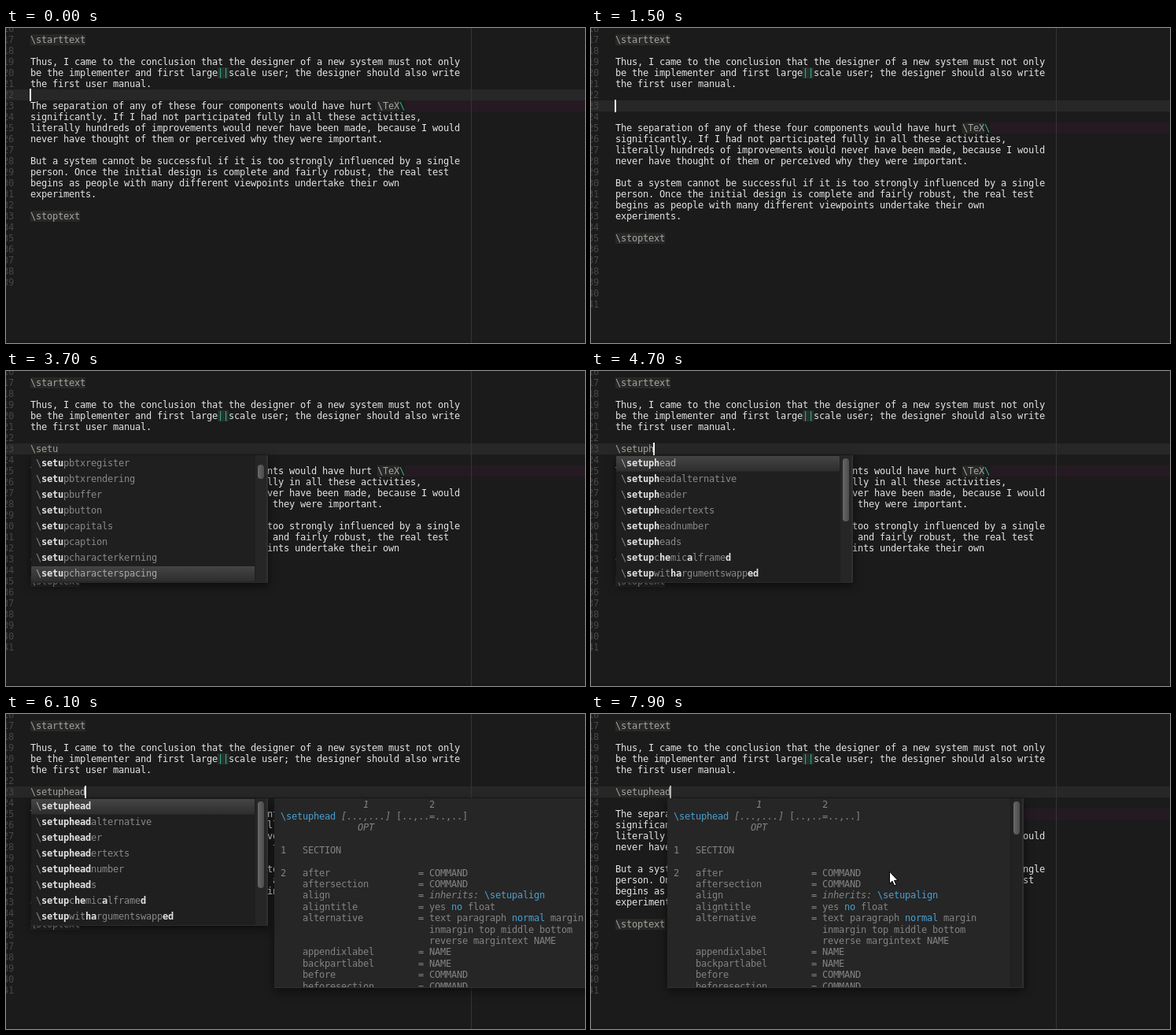
Recreate the animation shown at these times as an HTML page. Size 736 px wide and 400 px high, loop 8 s.

```html
<!DOCTYPE html>
<html lang="en">
<head>
<meta charset="utf-8">
<title>Command completion in a text editor</title>
<style>
  html, body { margin: 0; width: 100%; height: 100%; overflow: hidden; background: #1b1b1b; }
  svg { display: block; width: 736px; height: 400px; }
  text {
    font: 12px "DejaVu Sans Mono", monospace;
    letter-spacing: -.2246px;
    white-space: pre;
    fill: #e2e4e4;
  }
  .num { fill: #464646; text-anchor: end; }
  .cmd { fill: #a3a3a0; }
  .sym { fill: #35b58c; }
  .item { fill: #898989; }
  .item.on { fill: #a9a9a9; }
  .hit { fill: #e2e2e2; font-weight: bold; }
  .doc { fill: #838383; }
  .key { fill: #4b9fd0; }
  .it { font-style: italic; }
  .popup { filter: drop-shadow(0 4px 6px rgba(0, 0, 0, .55)); }
</style>
</head>
<body>
<svg viewBox="0 0 736 400">
  <defs>
    <linearGradient id="row" x2="0" y2="1">
      <stop stop-color="#454545"/><stop offset="1" stop-color="#2d2d2d"/>
    </linearGradient>
    <linearGradient id="thumb">
      <stop stop-color="#686868"/><stop offset="1" stop-color="#4c4c4c"/>
    </linearGradient>
    <clipPath id="docClip"><path d="M97 108H533V347H97Z"/></clipPath>
  </defs>
  <g id="scene"></g>
</svg>
<script>
const LOOP = 8000, STEP = 100, CHAR = 7, LINE = 14, LEFT = 31;
const scene = document.getElementById('scene');

const before = ['', '\\starttext', '',
  'Thus, I came to the conclusion that the designer of a new system must not only',
  'be the implementer and first large||scale user; the designer should also write',
  'the first user manual.'];
const after = [
  'The separation of any of these four components would have hurt \\TeX\\',
  'significantly. If I had not participated fully in all these activities,',
  'literally hundreds of improvements would never have been made, because I would',
  'never have thought of them or perceived why they were important.', '',
  'But a system cannot be successful if it is too strongly influenced by a single',
  'person. Once the initial design is complete and fairly robust, the real test',
  'begins as people with many different viewpoints undertake their own',
  'experiments.', '', '\\stoptext', '', '', '', '', '', ''];

// Key presses: time and the text of the edited line after it
const typing = [[2100, '\\'], [3000, '\\s'], [3100, '\\se'], [3200, '\\set'], [3300, '\\setu'],
  [4400, '\\setup'], [4700, '\\setuph'], [4900, '\\setuphe'], [5100, '\\setuphea'], [5300, '\\setuphead']];
const ENTER = [900, 1200], UP = 1400, OPEN = 2000, ACCEPT = 6100;
const SCROLL = [3400, 3800];
const keys = [0, ...ENTER, UP, 2500, ...typing.map(k => k[0]), ACCEPT];

// Completion lists by typed text; asterisks mark fuzzy matches
const words = s => s.split(' ');
const setups = words('setup ' + words('MPgraphics MPinstance MPpage MPvariables TABLE TEXpage ' +
  'align alternativestyles arranging attachment attachments backend background backgrounds bar bars ' +
  'bleeding block bookmark bottom bottomtexts btx btxdataset btxlist btxregister btxrendering buffer ' +
  'button capitals caption characterkerning characterspacing chemical chemicalframed collector color ' +
  'colors columns columnset combination counter').map(w => 'setup' + w).join(' '));
const heads = words('setuphead setupheadalternative setupheader setupheadertexts setupheadnumber ' +
  'setupheads *setup*c*he*mic*a*lframe*d* *setup*wit*ha*rgumentswapp*ed*');
const lists = {
  '\\': [words('AMSTEX AfterPar Alphabeticnumerals AmSTeX And BeforePar Big Bigg'), 18],
  '\\s': [words('scale screen section seeindex select serif setbar setups'), 18],
  '\\se': [words('section seeindex select serif setbar setbuffer setups setvalue'), 18],
  '\\set': [words('setbar setbreakpoint setbuffer setcapstrut setcatcodetable setcharacteralign ' +
    'setcharactercasing setcharacterkerning'), 18],
  '\\setu': [setups, 18],
  '\\setup': [setups, 18],
  '\\setuph': [heads, 80],
  '\\setuphe': [heads, 100],
  '\\setuphea': [heads, 110],
  '\\setuphead': [heads, 110]
};

// Manual page: _x_ is italic, `x` is a keyword
const option = (name, value) => '    ' + name.padEnd(21) + '= ' + value;
const manual = [
  ' '.repeat(15) + '_1_' + ' '.repeat(11) + '2',
  '`\\setuphead` _[...,...]_ [..,..=..,..]',
  ' '.repeat(14) + '_OPT_', '', '1   SECTION', '',
  option('after', 'COMMAND').replace(' ', '2'),
  option('aftersection', 'COMMAND'),
  option('align', '_inherits:_ `\\setupalign`'),
  option('aligntitle', 'yes `no` float'),
  option('alternative', 'text paragraph `normal` margin'),
  ' '.repeat(27) + 'inmargin top middle bottom',
  ' '.repeat(27) + 'reverse margintext NAME',
  option('appendixlabel', 'NAME'),
  option('backpartlabel', 'NAME'),
  option('before', 'COMMAND'),
  option('beforesection', 'COMMAND')];

const mouse = [[6800, 396, 24], [7000, 404, 110], [7200, 402, 236], [7400, 386, 212], [7600, 379, 200]];

const clamp = v => Math.max(0, Math.min(1, v));
const ramp = (t, a, b) => clamp((t - a) / (b - a));
const rect = (x, y, w, h, fill, extra = '') =>
  `<rect x="${x}" y="${y}" width="${w}" height="${h}" fill="${fill}" ${extra}/>`;
const text = (x, y, s, cls = '') => `<text x="${x}" y="${y}" class="${cls}">${s}</text>`;
const span = (cls, s) => `<tspan class="${cls}">${s}</tspan>`;
const group = (s, opacity, extra = '') => opacity > 0 ? `<g opacity="${opacity}" ${extra}>${s}</g>` : '';
const topOf = line => 92 + (line - 23) * LINE;

function codeLine(s, y) {
  let boxes = '';
  const body = s.replace(/\\[A-Za-z]+|\\|\|\|/g, (m, i) => {
    const cmd = /[a-z]/i.test(m);
    if (m !== '\\') boxes += rect(LEFT + i * CHAR, y, m.length * CHAR, LINE, cmd ? '#282826' : '#25302d');
    return span(cmd ? 'cmd' : 'sym', m);
  });
  if (s.endsWith('TeX\\')) boxes += rect(LEFT + s.length * CHAR, y, 736, LINE, '#251a22');
  return boxes + text(LEFT, y + 11, body);
}

function editor(t, typed) {
  const added = ENTER.filter(e => t >= e).length;
  const caretLine = 22 + added - (t >= UP ? 1 : 0);
  const blank = Array(added + 1).fill('');
  if (typed) blank[1] = typed;
  const lines = [...before, ...blank, ...after];
  const y = topOf(caretLine);
  let out = rect(0, 0, 736, 400, '#1b1b1b') + rect(0, 398, 736, 2, '#171717') +
    rect(0, y, 736, LINE, '#272727');
  lines.forEach((s, i) => {
    const top = topOf(16 + i);
    out += text(10, top + 11, 16 + i, 'num') + codeLine(s, top);
  });
  const since = t - Math.max(...keys.filter(k => k <= t));
  const glow = clamp(.5 + .6 * Math.cos(since / 1000 * 2 * Math.PI));
  return out + rect(591, 0, 1, 400, '#353535') +
    rect(LEFT - 1 + typed.length * CHAR, y - 1, 2, 16, '#f4f4f4', `opacity="${glow}"`);
}

const scrollbar = (x, y, h) => rect(x, y, 8, h, 'url(#thumb)', 'rx="4"');

function completions(t, typed) {
  if (!typed) return '';
  const [items, thumb] = lists[typed];
  const prefix = typed.slice(1);
  const selected = typed === '\\setu' ? Math.round(40 * ramp(t, SCROLL[0], SCROLL[1] - 25)) : 0;
  const first = Math.max(0, selected - 7);
  let out = rect(32, 107, 301, 162, '#1f1f1f') + rect(317, 107, 16, 162, '#262626') +
    rect(331, 107, 2, 162, '#303030') + rect(32, 268, 301, 1, '#2b2b2b') +
    scrollbar(320, 111 + first * .32, thumb);
  items.slice(first, first + 8).forEach((name, i) => {
    const on = first + i === selected;
    const marked = name.includes('*') || !prefix ? name : name.replace(prefix, '*$&*');
    const label = marked.split('*').map((s, k) => k % 2 ? span('hit', s) : s).join('');
    if (on) out += rect(32, 108 + 20 * i, 284, 19.5, 'url(#row)', 'rx="1"');
    out += text(38, 121 + 20 * i, '\\' + label, on ? 'item on' : 'item');
  });
  return out;
}

const manualText = manual.map((s, i) => text(105, Math.round(119.2 + 14.4 * i),
  s.replace(/_(.+?)_/g, span('it', '$1')).replace(/`(.+?)`/g, span('key', '$1')), 'doc')).join('');
const manualPopup = rect(97, 107, 453, 241, '#262626') +
  `<g clip-path="url(#docClip)">${manualText}</g>` +
  rect(533, 107, 16, 241, '#222') + rect(533, 107, 1, 241, '#1c1c1c') +
  rect(548, 107, 2, 241, '#2f2f2f') + rect(97, 347, 453, 1, '#2f2f2f') + scrollbar(537, 111, 42);

function pointer(t) {
  if (t < mouse[0][0]) return '';
  const i = Math.max(1, mouse.findIndex(m => m[0] > t));
  const done = t >= mouse.at(-1)[0];
  const [a, b] = done ? mouse.slice(-2) : [mouse[i - 1], mouse[i]];
  const k = ramp(t, a[0], b[0]);
  const x = a[1] + (b[1] - a[1]) * k, y = a[2] + (b[2] - a[2]) * k;
  return `<path transform="translate(${x} ${y})" d="M.5 0V15.5L4 12.2L6.6 18L9 17L6.5 11.3H11Z"
    fill="#fff" stroke="#000"/>`;
}

function draw(t) {
  const typed = typing.filter(k => k[0] <= t).map(k => k[1]).pop() || '';
  const closing = 1 - ramp(t, ACCEPT, ACCEPT + 200);
  const popup = 'class="popup"';
  scene.innerHTML = editor(t, typed) +
    group(manualPopup, ramp(t, 5300, 5700) * closing, popup + ' transform="translate(244 0)"') +
    group(completions(t, typed), ramp(t, OPEN, OPEN + 300) * closing, popup) +
    group(manualPopup, ramp(t, 6200, 6500), popup) +
    pointer(t);
}

let start, shown = -1;
function tick(now) {
  start ??= now;
  const t = Math.floor((now - start) % LOOP / STEP) * STEP;
  if (t !== shown) draw(shown = t);
  requestAnimationFrame(tick);
}
draw(0);
requestAnimationFrame(tick);
</script>
</body>
</html>
```
